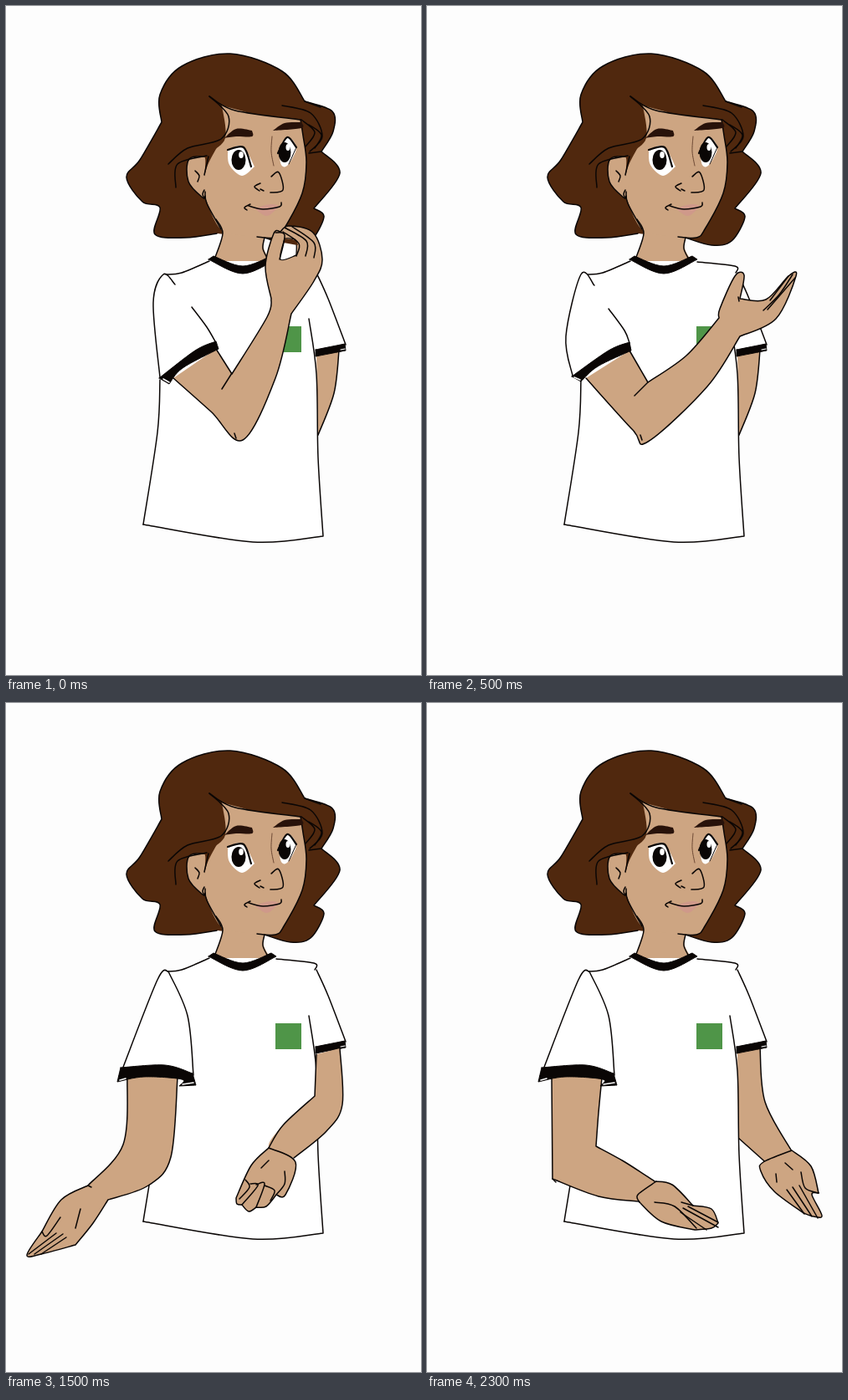
These frames come from a looping animation (496 by 800 pixels, 2500 ms). An HTML page:

```html
<!DOCTYPE html>
<html lang="en">
<head>
<meta charset="utf-8">
<title>Presenting gestures</title>
<style>
html, body { margin: 0; width: 100%; height: 100%; overflow: hidden; background: #fdfdfd; }
svg { display: block; width: 496px; height: 800px; }
path { stroke-linecap: round; stroke-linejoin: round; }
</style>
</head>
<body>
<svg id="stage" viewBox="0 0 496 800"></svg>
<script>
const NS = 'http://www.w3.org/2000/svg';
const SKIN = '#cda582', HAIR = '#50280e', INK = '#0a0605', WHITE = '#fff';
const BROW = '#28120a', LIP = '#cf998a', GREEN = '#4f9548';
const HOLD = 500;
const stage = document.getElementById('stage');

function add(parent, tag, attrs) {
  const node = document.createElementNS(NS, tag);
  for (const k in attrs) node.setAttribute(k, attrs[k]);
  return parent.appendChild(node);
}

// Smooth curve through points; "|" makes the previous point a sharp corner.
function curve(text) {
  let d = '', last = null;
  for (const part of text.split('|')) {
    const n = part.trim().split(/\s+/).map(Number);
    const p = last ? [last] : [];
    for (let i = 0; i < n.length; i += 2) p.push([n[i], n[i + 1]]);
    if (!last) d = 'M' + p[0];
    for (let i = 0; i < p.length - 1; i++) {
      const a = p[i - 1] || p[i], b = p[i], c = p[i + 1], e = p[i + 2] || c;
      const mix = (u, v, k) => u[k] + (v[k] - u[k]) / 6;
      const out = k => mix([0, 0], [c[0] - a[0], c[1] - a[1]], k) + b[k];
      const back = k => c[k] - (e[k] - b[k]) / 6;
      d += `C${out(0)} ${out(1)} ${back(0)} ${back(1)} ${c}`;
    }
    last = p[p.length - 1];
  }
  return d;
}
const fill = (g, color, pts) => add(g, 'path', { d: curve(pts) + 'Z', fill: color });
const line = (g, pts, w = 1.5, color = INK) =>
  add(g, 'path', { d: curve(pts), fill: 'none', stroke: color, 'stroke-width': w });
const shape = (g, color, pts, w) => { fill(g, color, pts); line(g, pts, w); };
const lines = (g, ...list) => list.forEach(pts => line(g, pts));
const oval = (g, cx, cy, rx, ry, color) => add(g, 'ellipse', { cx, cy, rx, ry, fill: color });
const group = () => add(stage, 'g', {});

function drawHair(g) {
  shape(g, HAIR, '252 272 215 277 178 273 184 241 163 234 144 205 160 184 186 139 | ' +
    '184 106 210 72 268 57 330 78 357 114 | 390 126 391 150 377 174 | 399 200 368 242 | ' +
    '380 252 364 281 340 286 309 277');
}

function drawFace(g) {
  const jaw = '352 136 355 155 359 187 354 224 332 267 322 277 300 276';
  const neck = '251 255 259 272 249 303';
  fill(g, SKIN, neck + ' | 285 320 318 308 | 308 290 309 276 | 330 230 | 238 226');
  fill(g, SKIN, jaw + ' | 258 268 238 229 | 242 182 262 158 258 119 | 295 129');
  shape(g, SKIN, '242 180 219 183 218 210 235 229 238 227');
  fill(g, SKIN, '235 186 | 243 186 | 240 227 | 232 224');
  fill(g, HAIR, '230 173 | 255 164 | 242 188 237 204 | 238 182 230 179');
  lines(g, jaw, neck, '238 222 240 236 257 267', '309 277 307 290 313 303');
  lines(g, '226 197 231 203 229 210', '237 220 235 225 237 230', '242 180 237 202');
}

function drawLocks(g) {
  lines(g, '243 108 266 132 257 159 217 170 194 189', '203 217 205 189 240 179',
    '243 108 274 125 352 136');
  lines(g, '330 119 364 128 378 156 363 174', '353 136 369 151 358 168',
    '362 142 377 154 369 170', '377 174 362 176', '357 114 376 121');
}

function drawEyes(g) {
  fill(g, BROW, '261 158 275 147 294 149 | 294 156 275 156 261 158');
  fill(g, BROW, '319 149 333 140 353 139 | 353 146 319 149');
  fill(g, WHITE, '265 172 283 168 297 192 | 282 203 267 190 265 172');
  oval(g, 278, 184, 8.5, 12, INK);
  oval(g, 281, 178, 2.8, 4, WHITE);
  line(g, '265 172 284 169 293 192', 2.2);
  fill(g, WHITE, '326 172 337 157 347 170 337 190 329 190 326 172');
  oval(g, 333, 175, 7.5, 12, INK);
  oval(g, 337, 169, 2.5, 4, WHITE);
  line(g, '325 176 336 157 347 169', 2.2);
  line(g, '347 169 338 189', 1);
}

function drawMouth(g) {
  line(g, '318 156 317 174 320 191', 1, '#6d4934');
  lines(g, '317 204 326 199 331 220 316 223', '304 212 297 216 303 221', '304 219 308 221');
  fill(g, LIP, '297 242 316 237 327 239 | 312 251 297 242');
  lines(g, '292 237 285 241 288 244', '290 239 307 243 327 240 329 235');
}

function drawShirt(g) {
  const side = '164 620 181 510 184 447';
  const hem = '362 374 371 440 373 540 379 634 | 295 641 164 620';
  fill(g, WHITE, side + ' | 190 322 | 243 305 | 323 305 | 370 312 | 406 405 | 370 417 | 373 540 379 634 | 295 641 164 620');
  lines(g, side, hem, '243 305 210 319 190 321', '323 306 368 311 369 319', '371 319 385 350 406 405');
  shape(g, INK, '242 303 248 299 | 283 311 317 299 | 323 303 | 283 320 242 303', 1);
  shape(g, INK, '370 411 405 404 | 406 412 | 370 419 | 370 411', 1);
  line(g, '400 411 405 410', 1.2, WHITE);
  add(g, 'rect', { x: 322, y: 383, width: 31, height: 31, fill: GREEN });
}

function restingArm(g) {
  shape(g, SKIN, '371 416 398 412 | 392 463 373 513');
}

function sleeve(g, outline, fold, band, ...tips) {
  fill(g, WHITE, outline + ' | ' + fold);
  lines(g, outline, fold);
  shape(g, INK, band, 1);
  tips.forEach(pts => line(g, pts, 1.6, WHITE));
}

function wideSleeve(g) {
  sleeve(g, '194 321 181 331 139 438', '224 445 | 217 374 194 321',
    '137 436 190 433 223 443 | 227 457 | 207 458 | 210 450 165 447 133 453 | 137 436',
    '136 451 143 449', '211 456 224 454');
}

function thinking(g) {
  shape(g, SKIN, '200 445 245 485 283 519 322 445 341 368 | 368 329 378 303 367 271 338 263 328 270 | ' +
    '320 272 310 311 317 350 | 312 372 270 440 | 251 410');
  shape(g, WHITE, '333 278 328 303 347 298 | 346 280 333 278', 1.3);
  fill(g, HAIR, '333 278 | 346 280 349 286 | 331 283');
  lines(g, '270 439 258 458', '273 511 275 517', '322 271 333 274 327 303');
  lines(g, '331 270 350 284 347 299', '333 265 359 281 358 299', '342 264 368 283 368 301');
  sleeve(g, '202 333 188 321 176 355 184 444', '251 403 | 240 384 222 360',
    '183 445 226 412 251 401 | 254 410 | 211 433 195 452 | 183 445', '188 446 195 450');
}

function openingUp(g) {
  shape(g, SKIN, '190 445 246 507 264 521 335 455 374 395 | 417 374 441 323 432 323 405 351 374 350 | ' +
    '379 322 368 323 350 362 349 373 | 310 418 264 450 | 242 412');
  lines(g, '264 450 248 466', '255 513 257 519', '437 321 421 345 402 364');
  lines(g, '432 323 410 352', '440 325 407 363', '372 348 373 353');
  sleeve(g, '200 334 184 321 166 395 174 442', '242 403 | 236 388 217 362',
    '173 443 217 412 242 402 | 244 412 | 204 431 184 449 | 173 443', '176 444 183 447');
}

function palmForward(g) {
  shape(g, SKIN, '170 430 200 487 223 516 290 488 345 432 372 406 | 424 401 450 380 430 377 398 384 367 374 | ' +
    '371 347 360 346 352 380 | 310 417 238 457 | 220 413');
  lines(g, '238 457 229 463', '215 509 218 514', '447 377 402 392');
  lines(g, '448 381 402 394', '442 389 405 400', '367 374 363 379');
  sleeve(g, '199 331 188 316 160 370 156 422', '225 404 | 219 380 210 360',
    '155 423 200 404 225 402 | 225 413 | 180 421 161 434 | 155 423', '160 431 167 428');
  line(g, '190 319 204 319');
}

function handsLeft(g) {
  const outer = '399 413 402 480 383 512 344 544';
  const inner = '314 532 331 505 369 470 | 371 420';
  fill(g, SKIN, outer + ' | ' + inner);
  lines(g, outer, inner);
  shape(g, SKIN, '314 532 293 553 275 592 | 276 599 282 600 | 290 608 299 603 | ' +
    '311 602 323 588 | 334 588 346 549 314 532');
  lines(g, '314 547 305 556', '286 570 291 579 279 593', '292 575 301 577 282 600');
  lines(g, '299 576 309 575 299 603', '309 577 321 583 316 595', '333 560 333 575 323 588');
  shape(g, SKIN, '145 446 140 528 98 577 | 66 594 43 632 | 25 660 42 659 83 648 | ' +
    '104 622 122 594 | 170 577 197 543 205 448');
  lines(g, '89 605 83 628', '98 577 102 579', '43 632 49 637 65 615');
  lines(g, '60 634 27 659', '68 635 34 659', '72 639 42 659');
  wideSleeve(g);
}

function loweredArm(g) {
  shape(g, SKIN, '371 416 398 412 | 404 477 436 536 | 410 554 | 372 520');
}

function handsRight(g) {
  shape(g, SKIN, '436 535 459 554 468 586 | 460 588 472 613 462 614 450 610 | ' +
    '415 584 399 560 402 549 436 535');
  lines(g, '417 563 418 573', '428 550 437 558', '447 561 452 580 468 586');
  lines(g, '445 577 467 616', '437 579 460 614', '430 582 451 611');
  shape(g, SKIN, '149 446 150 569 | 205 590 253 596 | 280 620 320 630 | 340 628 348 622 | ' +
    '340 605 318 601 | 293 576 272 572 | 235 548 202 530 | 205 490 209 448');
  lines(g, '274 572 252 588 254 597', '272 597 296 602 322 628', '318 601 304 597');
  lines(g, '306 604 348 627', '312 602 348 621', '303 609 334 630', '150 569 154 573');
  wideSleeve(g);
}

const far = [restingArm, restingArm, restingArm, null, loweredArm];
const near = [thinking, openingUp, palmForward, handsLeft, handsRight];
const layer = draw => {
  const g = group();
  if (draw) draw(g);
  return g;
};

const farLayers = far.map(layer);
[drawHair, drawFace, drawLocks, drawEyes, drawMouth, drawShirt].forEach(layer);
const nearLayers = near.map(layer);

function tick(now) {
  const current = Math.floor(now / HOLD) % near.length;
  for (const set of [farLayers, nearLayers])
    set.forEach((g, i) => { g.style.display = i === current ? '' : 'none'; });
  requestAnimationFrame(tick);
}
tick(0);
</script>
</body>
</html>
```
